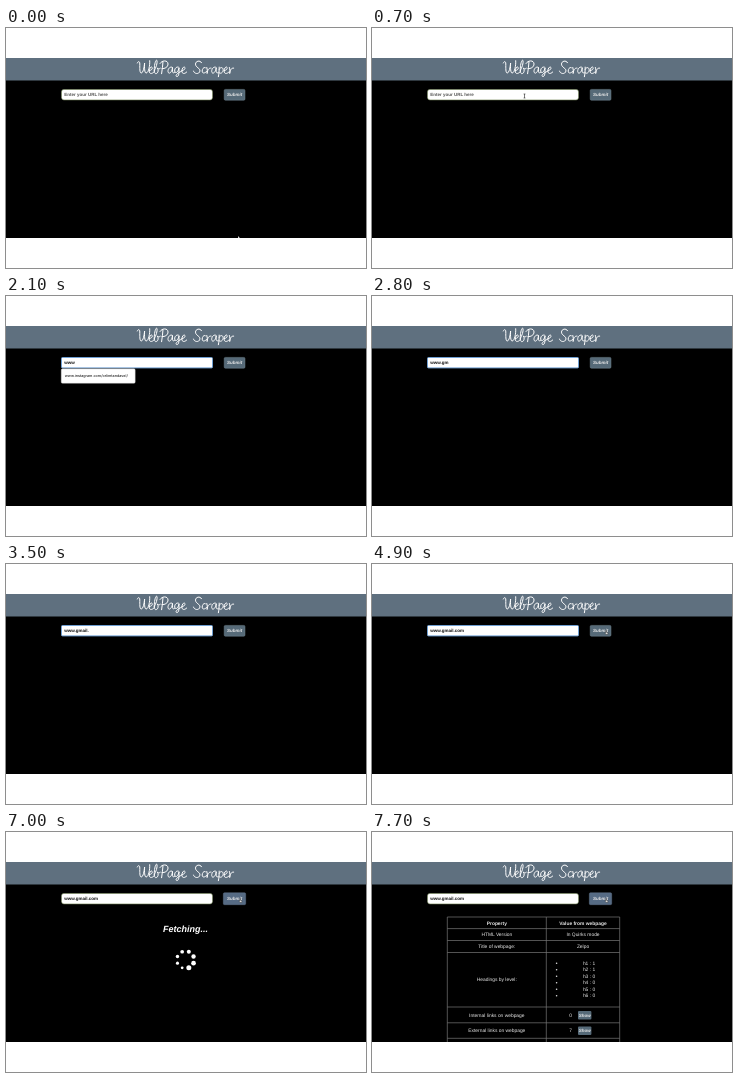
Recreate the animation shown at these times as an HTML page. Size 360 by 240 pixels, loop 8000 ms.

```html
<!DOCTYPE html>
<html lang="en">
<head>
<meta charset="utf-8">
<title>WebPage Scraper</title>
<style>
  html, body { margin: 0; width: 100%; height: 100%; overflow: hidden; background: #fff; }
  svg { display: block; width: 360px; height: 240px; }
  text { font: 4.9px "Liberation Sans", Arial, sans-serif; fill: #e8e8e8; text-rendering: geometricPrecision; }
  .bold { font-weight: 700; }
  .field { font-size: 4.5px; font-weight: 700; fill: #111; }
  .hint { fill: #555; }
  .button { font-size: 4.5px; font-weight: 700; font-style: italic; }
  .item { font: 500 3.7px Inter, sans-serif; fill: #222; }
  .fetch { font-size: 9px; font-weight: 700; font-style: italic; fill: #fff; }
  .mid { text-anchor: middle; }
  .title { fill: none; stroke: #fff; stroke-width: 1; stroke-linecap: round; stroke-linejoin: round; }
  .grid { fill: none; stroke: #777; stroke-width: .7; }
</style>
</head>
<body>
<svg id="stage" viewBox="0 0 360 240"></svg>
<script>
const STEP = 700, LOOP = 8000;
const SPIN = 168.75; // degrees per step

// One entry per step: typed text, list shown, pointer and page state
const steps = [
  { pointer: 'arrow' },
  { pointer: 'beam' },
  { pointer: 'beam', focus: 1, list: 'recent' },
  { typed: 'www', focus: 1, list: 'match' },
  { typed: 'www.gm', focus: 1 },
  { typed: 'www.gmail.', focus: 1 },
  { typed: 'www.gmail.com', focus: 1 },
  { typed: 'www.gmail.com', focus: 1, pointer: 'hand' },
  { typed: 'www.gmail.com', pointer: 'hand', hover: 1, page: 'loading' },
  { typed: 'www.gmail.com', pointer: 'hand', hover: 1, page: 'loading' },
  { typed: 'www.gmail.com', pointer: 'hand', hover: 1, page: 'loading' },
  { typed: 'www.gmail.com', pointer: 'hand', hover: 1, page: 'result' }
];

const text = (x, y, cls, s) => `<text x="${x}" y="${y}" class="${cls}">${s}</text>`;
const box = (x, y, w, h, r, fill, more = '') =>
  `<rect x="${x}" y="${y}" width="${w}" height="${h}" rx="${r}" fill="${fill}" ${more}/>`;

// Handwritten letters; the origin is on the baseline
const glyphs = {
  W: 'M0-10.5c.8-2 2.5-2 2.5 1c0 4-.2 9 1.4 9c2 0 3-6 3.4-10c-.3 5 0 10 1.5 10c2.5 0 4-8 3.6-12.3',
  e: 'M0-3c2 0 3.4-1.5 2.9-3c-.8-1.5-3 .5-3 3.5c0 3 2.6 3.3 4.8 1',
  b: 'M0-2.5c2-3 3.6-8 3-10.5c-1-1.5-2.5 3-2.7 8c0 4 .4 5.4 2 5.1c2-.5 2.5-4 1-5.5c1 1 2 1 3 .2',
  P: 'M3-11.8c-.3 4-.8 8-1.4 12M0-10c2-3.6 8-3.5 8 .5c0 3-3 5-6 4.5',
  a: 'M4.6-6c-2-1.7-4.8 1-4.6 4c.3 3 3.5 2 4.5-3.5c-.3 4 .2 6 2 4.5',
  g: 'M4.5-6c-2-1.7-4.7.8-4.4 3.5c.3 2.8 3.4 1.8 4.3-3c0 4 .2 8.5-2 8.5c-2 0-1-3 4.4-5.2',
  S: 'M8-10.8c-1.5-3-6-1.6-6 1.4c0 3.5 5 4 4.4 7c-.6 3.5-5.9 3-6.4 0',
  c: 'M3.6-5.5c-1-1.5-3.6 0-3.6 3c0 2.8 2.6 2.5 4.6 .3',
  r: 'M0-6c.6 2 .6 4 .3 6c.3-3 1.5-6 4-5.4',
  p: 'M.8-6.4c0 4-.3 7-.8 9.6M.7-4c1.5-3.2 4.5-2.2 4 1c-.6 3-3.4 3.5-4.2 2'
};
const letters = [['W', 131.3], ['e', 143.3], ['b', 148], ['P', 154], ['a', 162], ['g', 168.6], ['e', 176],
  ['S', 187.5], ['c', 196.2], ['r', 200.8], ['a', 205.7], ['p', 212.4], ['e', 218.2], ['r', 223.4]];

const title = () => '<g class="title" role="img" aria-label="WebPage Scraper">' +
  letters.map(([k, x]) => `<path transform="translate(${x} 45.5)" d="${glyphs[k]}"/>`).join('') + '</g>';

const lists = {
  recent: [54, ['gmail.com', 'goodreads.com', 'instagram.com', 'ada.com', 'nivora', 'news.ycombinator.com']],
  match: [74, ['www.instagram.com/orlimtandavel/']]
};
function list(name) {
  const [w, items] = lists[name];
  const h = items.length > 1 ? 64.5 : 14.5;
  return box(55.2, 72.8, w, h, 1.3, '#fff', 'stroke="#bbb" stroke-width=".4"') +
    items.map((s, i) => text(58.8, 81.2 + i * 10.12, 'item', s)).join('');
}

function field({ typed, focus }) {
  const edge = focus ? 'stroke="#6f9fd2" stroke-width="1"' : 'stroke="#7d8f62" stroke-width=".6"';
  let out = box(55.5, 61.5, 151, 10.4, focus ? 1 : 2.3, '#fff', edge);
  out += text(58.2, 68.1, typed ? 'field' : 'field hint', typed || 'Enter your URL here');
  return out;
}

const button = hover => (hover
  ? box(217.3, 60.7, 22.4, 12, 1.2, '#566b84', 'stroke="#687d92" stroke-width=".4"')
  : box(218.2, 61.4, 20.8, 10.8, 1.2, '#566a78', 'stroke="#71848f" stroke-width=".5"')) +
  text(228.7, 68.2, 'button mid', 'Submit');

const pointers = {
  arrow: '<path d="M232 208v2h1.9z" fill="#ddd"/>',
  beam: '<path d="M151.6 66h1.8M152.5 66v4M151.6 70h1.8" fill="none" stroke="#222" stroke-width=".6"/>',
  hand: '<path d="M233.8 66.4v2.2l-.6-.2v.8l.9 1.3h1.6l.3-1.8-1.5-.4v-1.9z" fill="#ddd" stroke="#222" stroke-width=".4"/>'
};

function loading(turn) {
  let dots = '';
  for (let i = 0; i < 8; i++) {
    const a = (90 + turn - i * 45) * Math.PI / 180;
    const r = 2.5 - i * .16;
    dots += `<circle cx="${179.5 + 8.7 * Math.cos(a)}" cy="${127.8 + 8.7 * Math.sin(a)}" r="${r}" fill="#fff"/>`;
  }
  return text(179.5, 100.2, 'fetch mid', 'Fetching...') + dots;
}

function result() {
  const rows = [
    [92.6, 'Property', 'Value from webpage', 'bold'],
    [104.2, 'HTML Version', 'In Quirks mode'],
    [116.2, 'Title of webpage:', 'Zelpo'],
    [149.2, 'Headings by level:', ''],
    [184.6, 'Internal links on webpage', ''],
    [200.2, 'External links on webpage', '']
  ];
  let out = '<path class="grid" d="M75.3 210V85H247.7V210M174.3 85V210' +
    [96.6, 108.5, 120.5, 175, 190.8, 206.3].map(y => `M75.3 ${y}H247.7`).join('') + '"/>';
  for (const [y, a, b, cls = ''] of rows)
    out += text(124.8, y, 'mid ' + cls, a) + text(211, y, 'mid ' + cls, b);
  [1, 1, 0, 0, 0, 0].forEach((n, i) => {
    const y = 132.8 + i * 6.5;
    out += `<circle cx="184.6" cy="${y - 1.6}" r=".8" fill="#ddd"/>` + text(217, y, 'mid', `h${i + 1} : ${n}`);
  });
  [[0, 184.6], [7, 200.2]].forEach(([n, y]) => {
    out += text(198.6, y, 'mid', n) + box(206, y - 5.6, 13.4, 8.4, 1, '#566a78') +
      text(212.7, y + .1, 'button mid', 'Show');
  });
  return out;
}

const backdrop = box(0, 30, 360, 180, 0, '#000') + box(0, 30, 360, 22.5, 0, '#5f707f') + title();
const stage = document.getElementById('stage');

function scene(i) {
  const s = steps[i];
  let out = backdrop + field(s) + button(s.hover);
  if (s.list) out += list(s.list);
  if (s.page === 'loading') out += loading((i - 8) * SPIN);
  if (s.page === 'result') out += result();
  return out + (pointers[s.pointer] || '');
}

let shown = -1;
function draw() {
  const i = Math.floor(performance.now() % LOOP / STEP);
  if (i !== shown) stage.innerHTML = scene(shown = i);
  requestAnimationFrame(draw);
}
draw();
</script>
</body>
</html>
```
